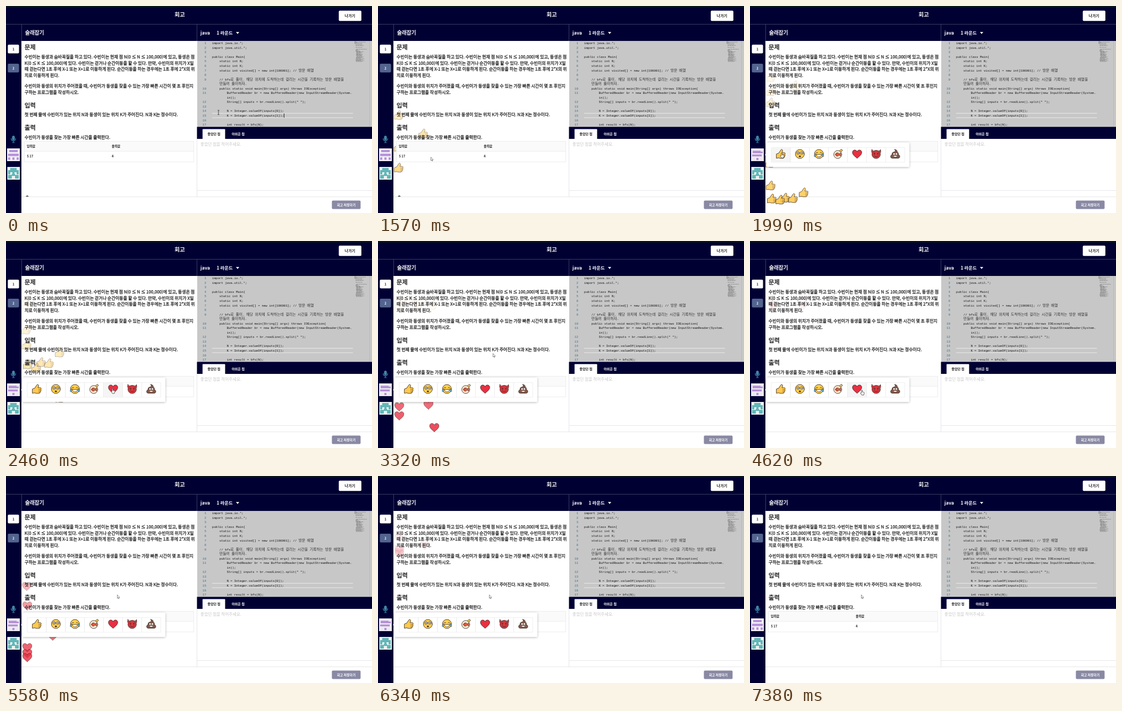
An HTML page for the animation above (7.45 s loop, 689 by 391 pixels).

```html
<!DOCTYPE html>
<html>
<head>
<meta charset="utf-8">
<style>
html, body { margin: 0; width: 100%; height: 100%; overflow: hidden; background: #fff; }
svg { display: block; width: 100vw; height: 100vh; }
text { font-family: "Noto Sans CJK KR", "Noto Sans CJK", "Noto Sans", sans-serif; fill: #222; }
.b { font-weight: 700; }
.w { fill: #fff; }
.body { font-size: 8.05px; stroke: #222; stroke-width: .28; }
.head { font-size: 11.4px; stroke: #222; stroke-width: .4; }
.cell { font-size: 5.9px; font-weight: 700; }
.code { font-family: "Liberation Mono", "DejaVu Sans Mono", monospace; font-size: 5.77px; fill: #111; }
.code .ko { font-family: "Noto Sans CJK KR", "Noto Sans CJK", sans-serif; font-size: 6.95px; font-weight: 300; fill: #333; }
.num { fill: #2b6f8a; text-anchor: end; }
.mid { text-anchor: middle; }
.ink { stroke: #3d2b22; stroke-width: .9; stroke-linejoin: round; stroke-linecap: round; }
.none { fill: none; }
</style>
</head>
<body>
<svg viewBox="0 0 689 391" preserveAspectRatio="none">
  <defs>
    <filter id="shadow" x="-10%" y="-30%" width="120%" height="160%">
      <feDropShadow dx="0" dy="1" stdDeviation="2" flood-opacity=".28"/>
    </filter>
    <clipPath id="panel"><rect x="29" y="340" width="330" height="20"/></clipPath>
    <g id="thumb" class="ink">
      <path fill="#ffc94d" d="M-8 0L-4-1.500L0-7.500C1-9.500 4-8.500 3.300-5.500L2.300-2.500H6.500C8.700-2.300 8.700 0 7.400.800C8.600 1.800 8.300 3.300 7.200 3.800C7.800 5.300 6.800 6.200 6 6.300C6.200 7.800 5 8.300 4 8.300H-1L-4 7.300L-8 8Z"/>
      <path class="none" stroke-width=".6" d="M3.500.800H7M3.500 3.700H7M3.500 6.300H6"/>
    </g>
    <g id="dizzy" class="ink">
      <circle r="8.500" fill="#ffcf4a"/>
      <g fill="#fff" stroke-width=".9"><circle cx="-3.500" cy="-1.800" r="2.600"/><circle cx="3.500" cy="-1.800" r="2.600"/></g>
      <g fill="#3d2b22" stroke="none"><circle cx="-3.500" cy="-1.800" r="1"/><circle cx="3.500" cy="-1.800" r="1"/><ellipse cy="4.500" rx="2" ry="1.600"/></g>
    </g>
    <g id="joy" class="ink">
      <circle r="8.500" fill="#ffcf4a"/>
      <path class="none" d="M-5.500-2Q-3.700-4.500-2-2M2-2Q3.700-4.500 5.500-2"/>
      <path fill="#fff" stroke-width=".8" d="M-4.500 1H4.500C4.500 7-4.500 7-4.500 1Z"/>
      <path fill="#54b5ec" stroke-width=".6" d="M-6-.500C-10 2-9.500 5.500-7.500 5C-5.500 4.500-5.500 2-6-.500ZM6-.500C10 2 9.500 5.500 7.500 5C5.500 4.500 5.500 2 6-.500Z"/>
    </g>
    <g id="dish" class="ink">
      <path fill="#ffcf4a" d="M2-5L6-9L8.500-7L5-3Z"/>
      <circle cx="-.500" cy="1" r="7.500" fill="#fbe9d0"/>
      <path fill="#ef5a3c" stroke-width=".8" d="M-5 1C-4-3 1-3 2 0L5-2V4L2 2C0 5-4 5-5 1Z"/>
      <circle cx="-2.500" cy=".500" r=".6" fill="#3d2b22" stroke="none"/>
    </g>
    <g id="heart" class="ink">
      <path fill="#ea2f42" d="M0 8C-5 4-8.700 1-8.700-3C-8.700-8.300-2-9 0-4.500C2-9 8.700-8.300 8.700-3C8.700 1 5 4 0 8Z"/>
    </g>
    <g id="devil" class="ink">
      <path fill="#d9363f" d="M-8-8.500Q-7.500-5.500-5-5.500Q0-8.500 5-5.500Q7.500-5.500 8-8.500Q9.500-4 7.500-1.500C9 4 5 8.500 0 8.500C-5 8.500-9 4-7.500-1.500Q-9.500-4-8-8.500Z"/>
      <path class="none" d="M-5-2.500L-2-1M5-2.500L2-1M-4 3.500Q0 7 4 3.500"/>
      <path fill="#3d2b22" stroke="none" d="M-4.800-1L-2 .200L-3.500 1.500ZM4.800-1L2 .200L3.500 1.500Z"/>
    </g>
    <g id="poop" class="ink">
      <path fill="#80584a" d="M-1-8.500C3-8 4.500-5.500 3.500-3.500C6-3 6.500-.500 5.500 1C9 1.500 10 7.500 6 8H-6C-10 7.500-9 1.500-5.500 1C-6.500-1-5.500-3-3-3.500C0-4 1-6-1-8.500Z"/>
      <g fill="#fff" stroke="none"><circle cx="-2.200" cy="0" r="1.500"/><circle cx="2.200" cy="0" r="1.500"/><path d="M-3.500 3.500H3.500Q0 7.500-3.500 3.500Z"/></g>
    </g>
  </defs>

  <rect width="689" height="391" fill="#fff"/>
  <rect width="689" height="66" fill="#000033"/>
  <rect width="29" height="391" fill="#000033"/>
  <rect width="689" height="3" fill="#07131c"/>
  <path d="M0 34.500H689M29.500 35V66M359.500 35V66" stroke="#4d4d70" class="none" stroke-width=".8"/>
  <text class="b w mid" x="327" y="20" font-size="10.600">회고</text>
  <rect x="626.500" y="8.800" width="42.500" height="19.400" rx="2" fill="#fff"/>
  <text class="b mid" x="647.500" y="21.200" font-size="7.200">나가기</text>
  <text class="w" x="36" y="54" font-size="9.700" stroke="#fff" stroke-width=".35">술래잡기</text>
  <text class="b w" x="366" y="53.500" font-size="8.800">java</text>
  <text class="b w" x="396.500" y="53.500" font-size="8.500">1 라운드</text>
  <path class="w" d="M433 49H439L436 53Z"/>

  <rect x="3.500" y="73" width="21" height="16.500" rx="2" fill="#fff"/>
  <text class="mid b" x="14" y="83.500" font-size="6">1</text>
  <rect x="3.500" y="109" width="21" height="16.500" rx="2" fill="#53648f"/>
  <text class="mid b w" x="14" y="119.500" font-size="6">2</text>
  <g stroke="#3f87a6" class="none" stroke-width="1.200">
    <rect x="12" y="245.500" width="4" height="7.500" rx="2" fill="#3f87a6"/>
    <path d="M9.700 250C9.700 256.500 18.300 256.500 18.300 250M14 255V258M11.500 258H16.500"/>
  </g>
  <rect x="2" y="269" width="24" height="24" fill="#f1eff4"/>
  <path fill="#b891dc" d="M6 272H22V276H6ZM4 279H24V283.500H4ZM4 286H8V290.500H4ZM12 286H16V290.500H12ZM20 286H24V290.500H20Z"/>
  <g id="pressed">
    <rect x="2" y="269" width="24" height="24" fill="#ece9f0"/>
    <path fill="#b58fd8" d="M5 273.500H20V275H24V278H5ZM4 280.500H22V284H4ZM12 287H16V291H12Z"/>
  </g>
  <rect x="2.500" y="304" width="23.500" height="24" fill="#eef2f2"/>
  <path fill="#63b7b8" d="M8 306H20V310H24V318H20V314H16V318H12V314H8V318H4V310H8ZM4 319H11V326H4ZM17 319H24V326H17ZM11 317H17V321H11Z"/>

  <rect x="360" y="66" width="329" height="163" fill="#c7c7c7"/>
  <path d="M388 202.700H653M388 211H653" class="none" stroke="#ececec" stroke-width="1"/>
  <g id="code"></g>
  <g id="minimap" stroke="#444" stroke-width=".7" opacity=".6"></g>
  <path d="M684.500 66V228" stroke="#b5b5b5" stroke-width=".7"/>
  <rect id="caret" x="523" y="203" width=".9" height="8" fill="#111"/>

  <rect x="359.500" y="228.300" width="329.500" height="22.700" fill="#000033"/>
  <path d="M370 251V233.500Q370 232.500 371 232.500H411.500Q412.500 232.500 412.500 233.500V251Z" fill="#fff"/>
  <text class="b mid" x="391.300" y="243.800" font-size="6.200">좋았던 점</text>
  <text class="b w mid" x="437" y="243.800" font-size="6.200">아쉬운 점</text>
  <text x="366" y="264" font-size="7.750" style="fill:#c6c6c6">좋았던 점을 적어주세요.</text>
  <path d="M359.500 251V360M360 348.500H689M29 360.500H689" stroke="#e4e4e8" class="none" stroke-width=".9"/>
  <rect x="613.500" y="367.500" width="54" height="16" rx="2" fill="#8989a4"/>
  <text class="b w mid" x="640.500" y="377.800" font-size="6.100">회고 저장하기</text>

  <g id="floaters"></g>

  <g id="problem"></g>
  <rect x="34.500" y="255.500" width="319" height="39" fill="#fff" stroke="#ebebeb" stroke-width=".9"/>
  <rect x="35" y="256" width="318" height="18.500" fill="#fafafa"/>
  <path d="M35 274.500H353" stroke="#ebebeb" stroke-width=".9"/>
  <text class="cell" x="39" y="267">입력값</text>
  <text class="cell" x="199" y="267">출력값</text>
  <text class="cell" x="39.500" y="286.200">5 17</text>
  <text class="cell" x="199" y="286.200">4</text>
  <path id="peek" clip-path="url(#panel)" d="M37.500 361Q40 356.500 42.500 361" class="none" stroke="#222" stroke-width="1.300"/>

  <g id="popover">
    <path d="M33 258H298Q300 258 300 260V302Q300 304 298 304H33Q31 304 31 302V284L28 281L31 278V260Q31 258 33 258Z" fill="#fff" filter="url(#shadow)"/>
    <rect id="hover" y="267.500" width="35.900" height="27.500" fill="#f5f5f5"/>
    <g id="choices"></g>
  </g>

  <g id="cursor">
    <path id="beam" d="M-1.500-4H1.500M0-4V4M-1.500 4H1.500" class="none" stroke="#222" stroke-width=".8"/>
    <path id="arrow" d="M-1.500-3.500V3L0 1.700L1 4L2 3.500L1 1.400H3Z" fill="#fff" stroke="#444" stroke-width=".6"/>
    <path id="hand" d="M-1.200-4Q-.3-5 .5-4V-1L3.500-.2Q4.300 0 4 1.500L3 5H-.5L-3 1.500Q-3 .3-1.200 1Z" fill="#fff" stroke="#222" stroke-width=".7"/>
  </g>
</svg>
<script>
const $ = id => document.getElementById(id);
const LOOP = 7450, START = 940, POP_OPEN = 1780, POP_CLOSE = 6600;

const sourceLines = `1|import java.io.*;
2|import java.util.*;
3|
4|public class Main{
5|    static int N;
6|    static int K;
7|    static int visited[] = new int[100001]; // 방문 배열
8|
9|    // bfs로 풀이. 해당 위치에 도착하는데 걸리는 시간을 기록하는 방문 배열을
|    만들어 풀이하자.
10|    public static void main(String[] args) throws IOException{
11|        BufferedReader br = new BufferedReader(new InputStreamReader(System.
|        in));
12|        String[] inputs = br.readLine().split(" ");
13|
14|        N = Integer.valueOf(inputs[0]);
15|        K = Integer.valueOf(inputs[1]);
16|
17|        int result = bfs(N);`.split("\n");

$("code").innerHTML = sourceLines.map((line, i) => {
  const [, num, indent, code] = line.match(/^(\d*)\|( *)(.*)$/);
  const y = 72.2 + i * 8.55;
  const rich = code.replace(/[가-힣]+/g, '<tspan class="ko">$&</tspan>');
  return `<text class="code num" x="377" y="${y}">${num}</text>` +
    `<text class="code" x="${388 + indent.length * 3.463}" y="${y}">${rich}</text>`;
}).join("");

const problem = [
  ["head", 82.3, "문제"],
  ["body", 99, "수빈이는 동생과 숨바꼭질을 하고 있다. 수빈이는 현재 점 N(0 ≤ N ≤ 100,000)에 있고, 동생은 점"],
  ["body", 110.6, "K(0 ≤ K ≤ 100,000)에 있다. 수빈이는 걷거나 순간이동을 할 수 있다. 만약, 수빈이의 위치가 X일"],
  ["body", 122.3, "때 걷는다면 1초 후에 X-1 또는 X+1로 이동하게 된다. 순간이동을 하는 경우에는 1초 후에 2*X의 위"],
  ["body", 134, "치로 이동하게 된다."],
  ["body", 154.3, "수빈이와 동생의 위치가 주어졌을 때, 수빈이가 동생을 찾을 수 있는 가장 빠른 시간이 몇 초 후인지"],
  ["body", 166, "구하는 프로그램을 작성하시오."],
  ["head", 191.5, "입력"],
  ["body", 208.3, "첫 번째 줄에 수빈이가 있는 위치 N과 동생이 있는 위치 K가 주어진다. N과 K는 정수이다."],
  ["head", 234.3, "출력"],
  ["body", 251.2, "수빈이가 동생을 찾는 가장 빠른 시간을 출력한다."]
];
$("problem").innerHTML = problem.map(([cls, y, s]) => `<text class="${cls}" x="35" y="${y}">${s}</text>`).join("");

// Minimap rows: short dashes of pseudo-random length
const noise = n => Math.abs(Math.sin(n * 12.9898) * 43758.5453) % 1;
$("minimap").innerHTML = Array.from({ length: 32 }, (_, i) => {
  if (noise(i + 3) < .2) return "";
  const x = 656 + (i > 4 ? 2 : 0) + (i > 9 ? 2 * noise(i + 50) : 0);
  const len = 4 + noise(i) * (i < 13 ? 19 : 11);
  return `<path d="M${x} ${67 + i * 1.22}h${len}" stroke-dasharray="${2 + 3 * noise(i + 9)} .6"/>`;
}).join("");

const emojis = ["thumb", "dizzy", "joy", "dish", "heart", "devil", "poop"];
const cellX = i => 40 + i * 35.9;
$("choices").innerHTML = emojis.map((name, i) =>
  `<rect x="${cellX(i)}" y="267.5" width="35.9" height="27.5" fill="none" stroke="#ececec" stroke-width=".8"/>` +
  `<use href="#${name}" x="${cellX(i) + 18}" y="279.5"/>`).join("");

// Reactions as [x, birth time]
const thumbs = [[39, 952], [85, 1075], [39, 1153], [39, 1267], [38, 1660], [39, 1800], [101, 1860],
  [66, 1925], [81, 1932], [41, 1940], [57, 1961], [40, 2120], [74, 2125], [102, 2130]];
const hearts = [[95, 3030], [40, 3040], [40, 3096], [106, 3190], [40, 3400], [100, 3430], [45, 3460],
  [39, 4971], [40, 5099], [88, 5267], [40, 5335], [40, 5375], [40, 5405]];
const floaters = [["thumb", thumbs], ["heart", hearts]].flatMap(([name, list]) => list.map(([x, birth]) => {
  const node = document.createElementNS("http://www.w3.org/2000/svg", "use");
  node.setAttribute("href", "#" + name);
  node.setAttribute("x", x);
  $("floaters").append(node);
  return { node, birth };
}));

const RISE = 1750, FROM_Y = 368, TO_Y = 103;

// cubic-bezier(.25, .1, .25, 1)
function ease(p) {
  const curve = (s, a, b) => 3 * (1 - s) * (1 - s) * s * a + 3 * (1 - s) * s * s * b + s ** 3;
  let lo = 0, hi = 1;
  for (let i = 0; i < 20; i++) {
    const m = (lo + hi) / 2;
    if (curve(m, .25, .25) < p) lo = m; else hi = m;
  }
  return curve(lo, .1, 1);
}

// Pointer stops as [time, x, y]
const stops = [[0, 400, 201], [940, 400, 201], [1400, 101, 289], [1590, 101, 289], [1710, 16, 281], [1820, 16, 281],
  [1930, 60, 282], [2240, 60, 282], [2400, 201, 283], [3060, 201, 283], [3230, 218, 216], [3700, 218, 216],
  [3950, 211, 286], [5200, 211, 286], [5400, 211, 228], [LOOP, 211, 228]];

function pointerAt(t) {
  const i = stops.findIndex(s => s[0] > t);
  const [t0, x0, y0] = stops[i - 1], [t1, x1, y1] = stops[i];
  const p = (t - t0) / (t1 - t0), k = p * p * (3 - 2 * p);
  return [x0 + (x1 - x0) * k, y0 + (y1 - y0) * k];
}

const show = (id, on) => $(id).style.display = on ? "" : "none";

function draw(t) {
  for (const { node, birth } of floaters) {
    const p = (t - birth) / RISE, alive = p >= 0 && p < 1;
    node.style.display = alive ? "" : "none";
    if (!alive) continue;
    const e = ease(p);
    node.setAttribute("y", FROM_Y + (TO_Y - FROM_Y) * e);
    node.setAttribute("opacity", .9 * (1 - e));
  }

  const open = t >= POP_OPEN && t < POP_CLOSE;
  show("popover", open);
  show("pressed", open);
  show("peek", t < 1710);
  show("caret", t < START);

  const [x, y] = pointerAt(t);
  const cell = Math.floor((x - 40) / 35.9);
  const overCell = open && y > 267 && y < 295 && cell >= 0 && cell < emojis.length;
  show("hover", overCell);
  if (overCell) $("hover").setAttribute("x", cellX(cell));

  const kind = x > 360 ? "beam" : overCell || x < 28 ? "hand" : "arrow";
  for (const id of ["beam", "arrow", "hand"]) show(id, id === kind);
  $("cursor").setAttribute("transform", `translate(${x} ${y})`);
}

const began = performance.now();
function tick() {
  draw((performance.now() - began) % LOOP);
  requestAnimationFrame(tick);
}
tick();
</script>
</body>
</html>
```
